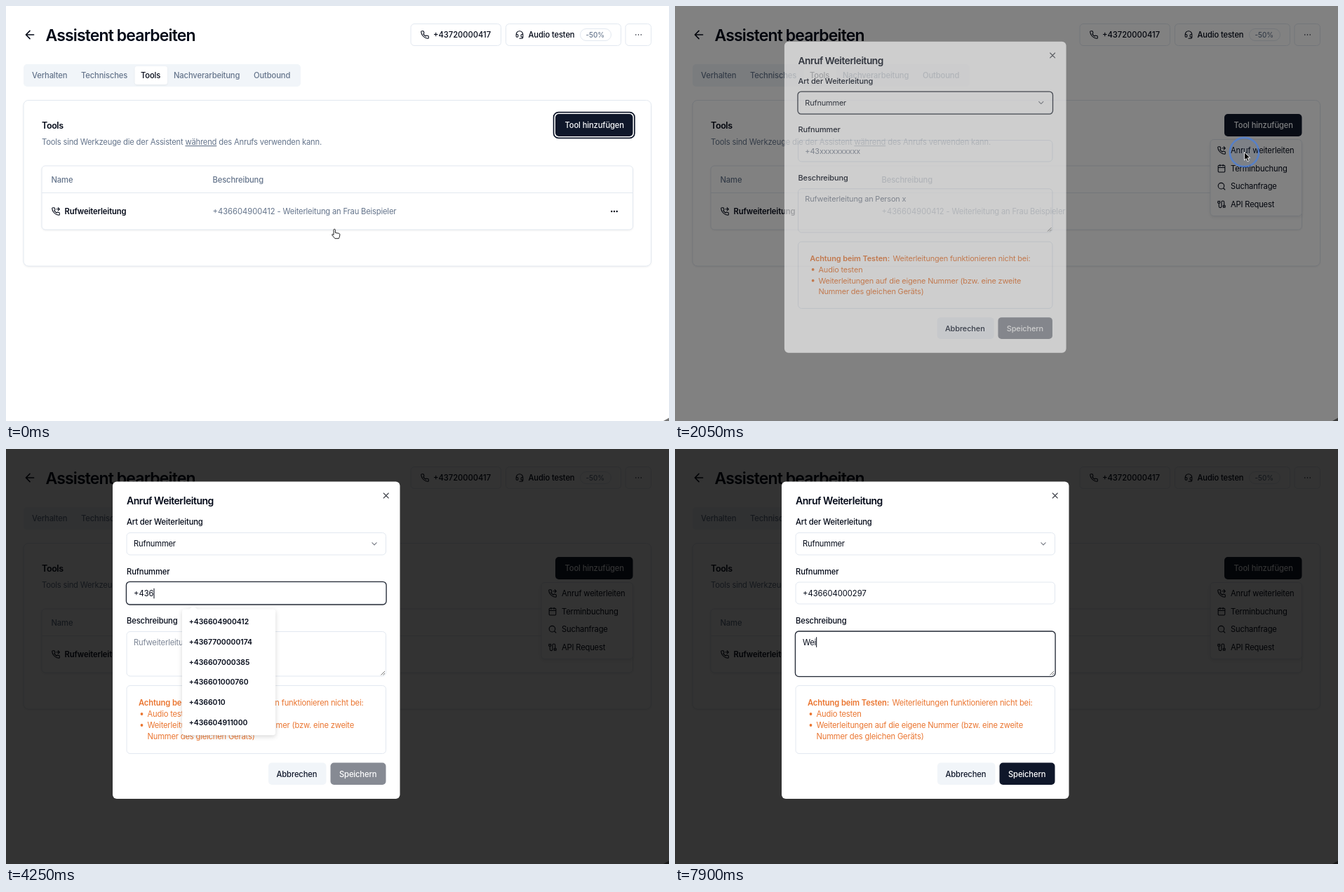
Write an HTML page that moves like this. It is 945 by 592 pixels and loops after 8 s.

```html
<!DOCTYPE html>
<html lang="de">
<head>
<meta charset="utf-8">
<title>Assistent bearbeiten</title>
<style>
  html, body { margin: 0; width: 100%; height: 100%; overflow: hidden; background: #fff; }
  svg { display: block; width: 100%; height: 100%; }
  text { font-family: Inter, sans-serif; font-optical-sizing: none; letter-spacing: -.0162em; white-space: pre; }
  .medium { font-weight: 500; letter-spacing: -.011em; }
  .semi { font-weight: 600; letter-spacing: -.01em; }
  .num { letter-spacing: 0; }
  .icon { fill: none; stroke-linecap: round; stroke-linejoin: round; }
  .soft { filter: drop-shadow(0 1px 1px rgba(0, 0, 0, .06)); }
  .menu { filter: drop-shadow(0 2px 2px rgba(0, 0, 0, .07)); }
  .float { filter: drop-shadow(0 2px 3px rgba(0, 0, 0, .16)); }
</style>
</head>
<body>
<svg id="stage" viewBox="0 0 945 592"></svg>
<script>
const LOOP = 8000;
const INK = '#020817', NAVY = '#0f172a', MUTED = '#64748b', LINE = '#e2e8f0', PALE = '#f1f5f9', ORANGE = '#ea7530';
const MAIN_NUMBER = '+436604900412';
const SUGGESTIONS = ['+491111', '+431000000217', '+491700000628', '+4911111', MAIN_NUMBER, '+431000000249',
  '+4367700000174', '+436607000385', '+436601000760', '+4366010', '+436604911000'];

const PHONE = 'M22 16.92v3a2 2 0 0 1-2.18 2 19.79 19.79 0 0 1-8.63-3.07 19.5 19.5 0 0 1-6-6 19.79 19.79 0 0 1-3.07-8.67A2 2 0 0 1 4.11 2h3a2 2 0 0 1 2 1.72 12.84 12.84 0 0 0 .7 2.81 2 2 0 0 1-.45 2.11L8.09 9.91a16 16 0 0 0 6 6l1.27-1.27a2 2 0 0 1 2.11-.45 12.84 12.84 0 0 0 2.81.7A2 2 0 0 1 22 16.92z';
const ICONS = {
  phone: PHONE,
  forward: PHONE + 'M18 2l4 4-4 4M14 6h8',
  headset: 'M3 11h3a2 2 0 0 1 2 2v3a2 2 0 0 1-2 2H5a2 2 0 0 1-2-2v-5Zm0 0a9 9 0 1 1 18 0m0 0v5a2 2 0 0 1-2 2h-1a2 2 0 0 1-2-2v-3a2 2 0 0 1 2-2h3ZM21 16v2a4 4 0 0 1-4 4h-5',
  calendar: 'M8 2v4M16 2v4M3 10h18M5 4h14a2 2 0 0 1 2 2v14a2 2 0 0 1-2 2H5a2 2 0 0 1-2-2V6a2 2 0 0 1 2-2z',
  search: 'M21 21l-4.3-4.3M19 11a8 8 0 1 1-16 0 8 8 0 0 1 16 0z',
  cable: 'M17 21v-2a1 1 0 0 1-1-1v-1a2 2 0 0 1 2-2h2a2 2 0 0 1 2 2v1a1 1 0 0 1-1 1M19 15V6.5a1 1 0 0 0-7 0v11a1 1 0 0 1-7 0V9M21 21v-2h-4M3 5h4V3M7 5a1 1 0 0 1 1 1v1a2 2 0 0 1-2 2H4a2 2 0 0 1-2-2V6a1 1 0 0 1 1-1V3',
  back: 'M19 12H5M12 19l-7-7 7-7',
  dots: 'M5 12h.01M12 12h.01M19 12h.01',
  close: 'M18 6L6 18M6 6l12 12',
  chevron: 'M6 9l6 6 6-6'
};

// Text is placed by its left edge and the middle of its capitals.
const text = (x, cy, content, { size = 11.2, cls = '', fill = INK, attrs = '' } = {}) =>
  `<text x="${x}" y="${cy + size * .36}" font-size="${size}" class="${cls}" fill="${fill}" ${attrs}>${content}</text>`;
const box = (x, y, right, bottom, r, fill, stroke = 'none', attrs = '') =>
  `<rect x="${x}" y="${y}" width="${right - x}" height="${bottom - y}" rx="${r}" fill="${fill}" stroke="${stroke}" ${attrs}/>`;
const icon = (name, cx, cy, { size = 12.8, color = INK, weight = 2 } = {}) =>
  `<path class="icon" d="${ICONS[name]}" stroke="${color}" stroke-width="${weight}"
    transform="translate(${cx - size / 2} ${cy - size / 2}) scale(${size / 24})"/>`;
const focusBox = (id, y, bottom) =>
  box(171.4, y, 542.1, bottom, 5, 'none', '#262b36', `stroke-width="1.3" id="${id}"`);

const muted = { fill: MUTED }, medium = { cls: 'medium' }, tab = { cls: 'medium', fill: MUTED };
const menuItems = [['forward', 'Anruf weiterleiten'], ['calendar', 'Terminbuchung'], ['search', 'Suchanfrage'], ['cable', 'API Request']];

const page = `
  ${icon('back', 34, 41, { size: 19.2 })}
  ${text(56.5, 41.5, 'Assistent bearbeiten', { size: 23, cls: 'semi', attrs: 'style="letter-spacing:-.0375em"' })}
  ${box(577, 25.5, 705.5, 56.5, 5, '#fff', LINE)}
  ${icon('phone', 597, 41)}
  ${text(609, 41, '+43720000417', { cls: 'medium num' })}
  ${box(712.5, 25.5, 876.5, 56.5, 5, '#fff', LINE)}
  ${icon('headset', 732, 41)}
  ${text(744.5, 41, 'Audio testen', medium)}
  ${box(818.5, 32.5, 862.5, 49.5, 8.5, '#fff', LINE)}
  ${text(826.5, 41, '-50%', { size: 9.8, cls: 'medium num', fill: MUTED })}
  ${box(883, 25.5, 919.5, 56.5, 5, '#fff', LINE)}
  ${icon('dots', 901.5, 41, { weight: 2.8 })}

  ${box(25, 83, 420, 115, 5, PALE)}
  ${box(183.5, 86, 230, 112, 3.5, '#fff', 'none', 'class="soft"')}
  ${text(37, 99, 'Verhalten', tab)}
  ${text(107, 99, 'Technisches', tab)}
  ${text(192, 99, 'Tools', medium)}
  ${text(239, 99, 'Nachverarbeitung', tab)}
  ${text(353, 99, 'Outbound', tab)}

  ${box(25, 134.5, 919.5, 371, 7, '#fff', LINE, 'class="soft"')}
  ${text(51, 170.5, 'Tools', { size: 12.5, cls: 'semi', attrs: 'style="letter-spacing:-.03em"' })}
  ${text(51, 194, 'Tools sind Werkzeuge die der Assistent <tspan text-decoration="underline">während</tspan> des Anrufs verwenden kann.', muted)}
  ${box(780.6, 151.6, 895.9, 188.4, 7, 'none', NAVY, 'stroke-width="1.7" id="buttonRing"')}
  ${box(783, 154, 893.5, 186, 5, NAVY)}
  ${text(796.5, 170, 'Tool hinzufügen', { cls: 'medium', fill: '#f8fafc' })}

  ${box(51, 228, 893.5, 319, 5, '#fff', LINE, 'class="soft"')}
  <path d="M51 266.5H893.5" stroke="${LINE}"/>
  ${text(64.5, 247.5, 'Name', tab)}
  ${text(294.5, 247.5, 'Beschreibung', tab)}
  ${icon('forward', 71, 293)}
  ${text(83.5, 293, 'Rufweiterleitung', { cls: 'semi' })}
  ${text(294.5, 293, `<tspan class="num">${MAIN_NUMBER}</tspan> - Weiterleitung an Frau Beispieler`, muted)}
  ${icon('dots', 867, 293, { weight: 4.4 })}

  <g id="menu">
    ${box(763, 190.5, 893.5, 299.5, 5, '#fff', LINE, 'class="menu"')}
    ${box(766.5, 193.5, 890, 219, 3, PALE, 'none', 'id="hover"')}
    ${menuItems.map(([name, label], i) => icon(name, 779, 206 + i * 25.6) + text(792, 206 + i * 25.6, label)).join('')}
  </g>
  <path d="M945 587.5l-8 4.5h8z" fill="#777"/>`;

const orange = { fill: ORANGE };
const dialog = `
  ${box(152, 46.5, 561.5, 499, 6, '#fff')}
  ${text(172, 74, 'Anruf Weiterleitung', { size: 14, cls: 'semi', attrs: 'style="letter-spacing:-.033em"' })}
  ${icon('close', 541.7, 66.5, { color: '#44474f', size: 14 })}

  ${text(172, 104, 'Art der Weiterleitung', medium)}
  ${box(172, 119.5, 541.5, 151, 5, '#fff', LINE)}
  ${focusBox('selectFocus', 119.1, 151.9)}
  ${text(182, 135.3, 'Rufnummer')}
  ${icon('chevron', 525, 135.3, { color: '#71757f' })}

  ${text(172, 174.5, 'Rufnummer', medium)}
  ${box(172, 190, 541.5, 221, 5, '#fff', LINE)}
  ${focusBox('phoneFocus', 189.3, 222)}
  ${text(182, 206, '+43xxxxxxxxxx', { fill: '#7c8595', attrs: 'id="phoneHint"' })}
  ${text(182, 206, '', { cls: 'num', attrs: 'id="phoneText"' })}

  ${text(172, 245, 'Beschreibung', medium)}
  ${box(172, 260.5, 541.5, 324, 5, '#fff', LINE)}
  ${focusBox('noteFocus', 260, 324.6)}
  <path d="M534.5 322.5l5.5-5.5M537.5 322.5l2.5-2.5" stroke="#666" stroke-width=".9"/>
  ${text(182, 275.5, 'Rufweiterleitung an Person x', { fill: '#7c8595', attrs: 'id="noteHint"' })}
  ${text(182, 275.5, '', { attrs: 'id="noteText"' })}
  <rect id="caret" width="1" height="14.5" fill="${INK}"/>

  ${box(172, 337.5, 541.5, 434.5, 5, '#fff', LINE)}
  ${text(189, 362, 'Achtung beim Testen:', { cls: 'semi', fill: ORANGE })}
  ${text(309.5, 362, 'Weiterleitungen funktionieren nicht bei:', orange)}
  ${[378, 394].map(y => `<circle cx="193.5" cy="${y}" r="1.9" fill="${ORANGE}"/>`).join('')}
  ${text(201.5, 378, 'Audio testen', orange)}
  ${text(201.5, 394, 'Weiterleitungen auf die eigene Nummer (bzw. eine zweite', orange)}
  ${text(201.5, 410, 'Nummer des gleichen Geräts)', orange)}

  ${box(374, 447.5, 456.5, 479, 5, PALE)}
  ${text(385.5, 463.5, 'Abbrechen', { cls: 'medium', fill: NAVY })}
  <g id="save">
    ${box(462.5, 447.5, 541.5, 479, 5, NAVY)}
    ${text(475, 463.5, 'Speichern', { cls: 'medium', fill: '#fff' })}
  </g>

  <g id="popup">
    <g class="float">
      <path d="M261 229l6-6 6 6z" fill="#fff"/>
      <rect id="popupBox" x="251" y="228.5" rx="4" fill="#fff"/>
    </g>
    <g id="popupRows"></g>
  </g>`;

const pointer = `
  <circle id="clickRing" stroke-width="2.6" stroke="rgba(64,128,240,.62)" fill="rgba(64,128,240,.05)"/>
  <g id="pointer">
    <path id="hand" d="M-1.5 8V1a1.2 1.2 0 0 1 2.4 0v4l5 .8q1.6.4 1.5 2l-.6 3.2-1 2.2H.4l-3.9-4.6q-.9-1.4.3-1.6z" fill="#fff" stroke="#222" stroke-width="1"/>
    <path id="arrow" d="M0 0v11.5l2.7-2.5 1.9 4.3 2-.9-1.9-4.2h3.7z" fill="#000" stroke="#fff" stroke-width=".9"/>
    <path id="beam" d="M-2.5-6q2 0 2.5 1.2.5-1.2 2.5-1.2M0-5V5M-2.5 6q2 0 2.5-1.2.5 1.2 2.5 1.2" fill="none" stroke="#000"/>
  </g>`;

stage.innerHTML = `${page}<rect id="overlay" width="945" height="592"/><g id="dialog">${dialog}</g>${pointer}`;

const $ = id => document.getElementById(id);
const set = (id, attrs) => { for (const name in attrs) $(id).setAttribute(name, attrs[name]); };
const show = (id, on) => set(id, { visibility: on ? 'inherit' : 'hidden' });
const progress = (t, start, duration) => Math.min(1, Math.max(0, (t - start) / duration));
const easeOut = x => 1 - (1 - x) ** 3;
const easeInOut = x => x * x * (3 - 2 * x);
const zoomAbout = (x, y, s) => `translate(${x} ${y}) scale(${s}) translate(${-x} ${-y})`;

const MENU_OPEN = 1050, DIALOG_OPEN = 2010, PHONE_FOCUS = 3140, NOTE_FOCUS = 6640;
const CLICKS = [980, 1940, 3100];
const MOVES = [[100, 750, 838, 168], [1300, 400, 811.5, 208.5], [2250, 750, 408.3, 194.5]];
const phoneTyping = { value: '+436604000297', times: [3550, 3750, 3900, 4150, 4400, 4600, 4900, 5150, 5350, 5600, 5900, 6200, 6350] };
const noteTyping = { value: 'Wei', times: [7350, 7600, 7850] };
const typed = ({ value, times }, t) => value.slice(0, times.filter(k => k <= t).length);

function drawPopup(t, value) {
  const rows = SUGGESTIONS.filter(s => s.startsWith(value)).slice(0, 6);
  const open = t >= PHONE_FOCUS && t < NOTE_FOCUS && rows.length > 0;
  show('popup', open);
  const key = rows.join();
  if (!open || drawPopup.key === key) return;
  drawPopup.key = key;
  $('popupRows').innerHTML = rows.map((row, i) =>
    text(260.8, 246.2 + i * 28.8, row, { size: 10.4, cls: 'semi num' })).join('');
  const widest = Math.max(...[...$('popupRows').children].map(row => row.getComputedTextLength()));
  set('popupBox', { width: widest + 43, height: 28.8 * rows.length + 7 });
}

function drawCaret(t, inNote) {
  const { times } = inNote ? noteTyping : phoneTyping;
  const last = Math.max(inNote ? NOTE_FOCUS : PHONE_FOCUS, ...times.filter(k => k <= t));
  show('caret', t >= PHONE_FOCUS && Math.floor((t - last) / 500) % 2 === 0);
  const field = $(inNote ? 'noteText' : 'phoneText');
  set('caret', { x: 182 + (field.textContent ? field.getComputedTextLength() : 0), y: inNote ? 268.3 : 198.8 });
}

function drawPointer(t) {
  let x = 468.5, y = 318.5;
  for (const [start, duration, toX, toY] of MOVES) {
    const p = easeInOut(progress(t, start, duration));
    x += (toX - x) * p;
    y += (toY - y) * p;
  }
  const hand = t < 150 || (t >= 700 && t < 1450);
  const beam = t >= 2900;
  set('pointer', { transform: `translate(${x} ${y})` });
  show('pointer', t < phoneTyping.times[0]);
  show('hand', hand);
  show('beam', beam);
  show('arrow', !hand && !beam);

  const click = CLICKS.filter(k => k <= t).pop() ?? -LOOP;
  set('clickRing', {
    cx: x, cy: y, r: 21 * easeOut(progress(t, click, 150)),
    opacity: 1 - progress(t, click + 250, 200)
  });
}

function draw(t) {
  show('buttonRing', t < CLICKS[0]);
  const menu = easeOut(progress(t, MENU_OPEN, 150));
  set('menu', { opacity: menu, transform: `translate(0 ${-6 * (1 - menu)}) ${zoomAbout(893, 190, .95 + .05 * menu)}` });
  show('hover', t >= 1600 && t < DIALOG_OPEN);

  const fade = easeOut(progress(t, DIALOG_OPEN, 150));
  set('overlay', { opacity: .8 * fade });
  set('dialog', { opacity: fade, transform: zoomAbout(356.75, 272.75, .95 + .05 * fade) });

  const phone = typed(phoneTyping, t), note = typed(noteTyping, t), inNote = t >= NOTE_FOCUS;
  show('selectFocus', t < PHONE_FOCUS);
  show('phoneFocus', t >= PHONE_FOCUS && !inNote);
  show('noteFocus', inNote);
  $('phoneText').textContent = phone;
  $('noteText').textContent = note;
  show('phoneHint', !phone);
  show('noteHint', !note);
  set('save', { opacity: .5 + .5 * progress(t, noteTyping.times[0], 150) });

  drawPopup(t, phone);
  drawCaret(t, inNote);
  drawPointer(t);
}

const begin = performance.now();
function tick() {
  draw((performance.now() - begin) % LOOP);
  requestAnimationFrame(tick);
}
tick();
</script>
</body>
</html>
```
